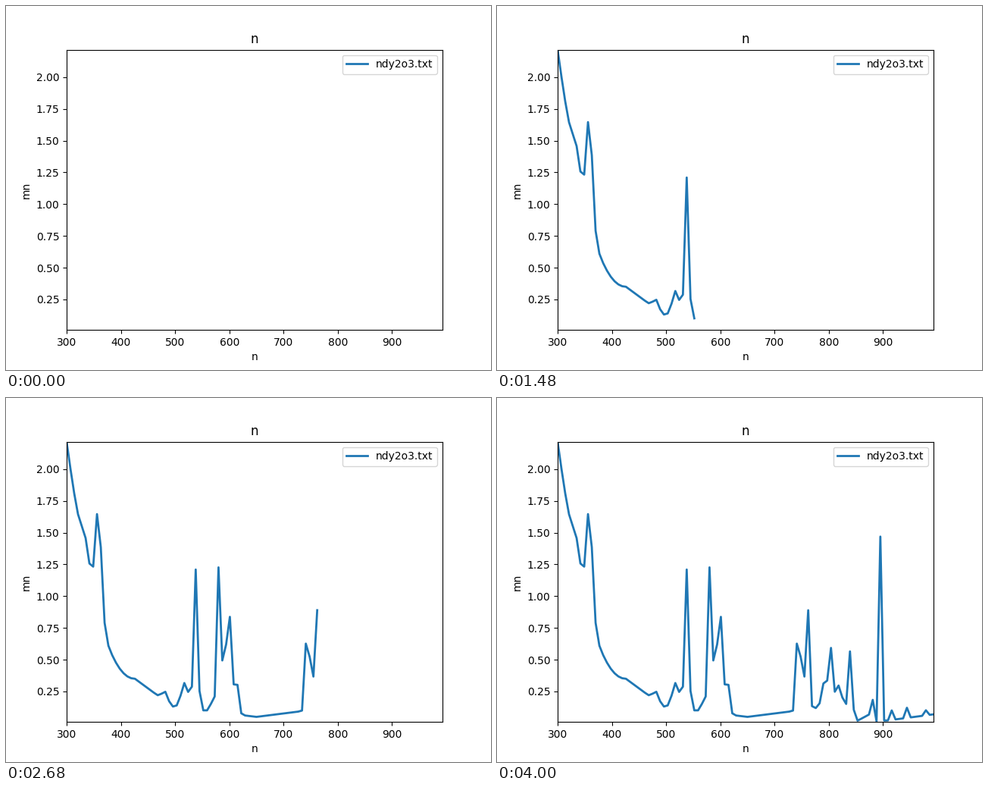
Recreate the animation shown at these times as a matplotlib script. Size 640 by 480 pixels, loop 5600 ms.

```python
import numpy as np
import matplotlib.pyplot as plt
from matplotlib.animation import FuncAnimation

STEP_MS = 40
LOOP_MS = 5600
Y_MIN, Y_MAX = 0.01, 2.216

# Slowly varying background, as (position, level)
BACKGROUND = [(426, 0.35), (496, 0.13), (650, 0.05), (780, 0.12),
              (846, 0.045), (853, 0.02), (874, 0.068), (888, 0.01),
              (993, 0.07)]

# Absorption bands, as (centre, height, width)
BANDS = [(335, 0.165, 7), (358.5, 0.83, 5.6), (481, 0.075, 5),
         (518, 0.2, 6.5), (538, 1.1, 3.5), (572, 0.12, 5),
         (580, 1.06, 2), (591.2, 0.58, 5), (601, 0.67, 3),
         (612, 0.31, 4), (741, 0.424, 2), (749.5, 0.44, 5),
         (762, 0.76, 2.6), (793.5, 0.25, 5.5), (804, 0.43, 3),
         (818, 0.22, 7), (839, 0.51, 3.4), (881, 0.145, 2),
         (895, 1.455, 2), (916, 0.075, 2), (944, 0.08, 2),
         (979, 0.04, 2)]


def spectrum(x):
    """Steep short-wave edge on a low background, with Gaussian bands."""
    edge = (Y_MAX - 0.35) * np.clip((426 - x) / 126, 0, 1) ** 2.1
    level = edge + np.interp(x, *zip(*BACKGROUND))
    for centre, height, width in BANDS:
        level += height * np.exp(-0.5 * ((x - centre) / width) ** 2)
    return np.clip(level, Y_MIN, Y_MAX)


x = np.arange(300, 994, 7)
y = spectrum(x)

fig, ax = plt.subplots(figsize=(6.4, 4.8), dpi=100)
ax.set(xlim=(x[0], x[-1]), ylim=(Y_MIN, Y_MAX),
       title="n", xlabel="n", ylabel="mn")
line, = ax.plot([], [], lw=2, color="#1f77b4", label="ndy2o3.txt")
ax.legend(loc="upper right")


def update(frame):
    """Reveal one more sample per frame, then hold the full curve."""
    line.set_data(x[:frame], y[:frame])
    return line,


anim = FuncAnimation(fig, update, frames=LOOP_MS // STEP_MS,
                     interval=STEP_MS, repeat=True, repeat_delay=0)
plt.show()
```
